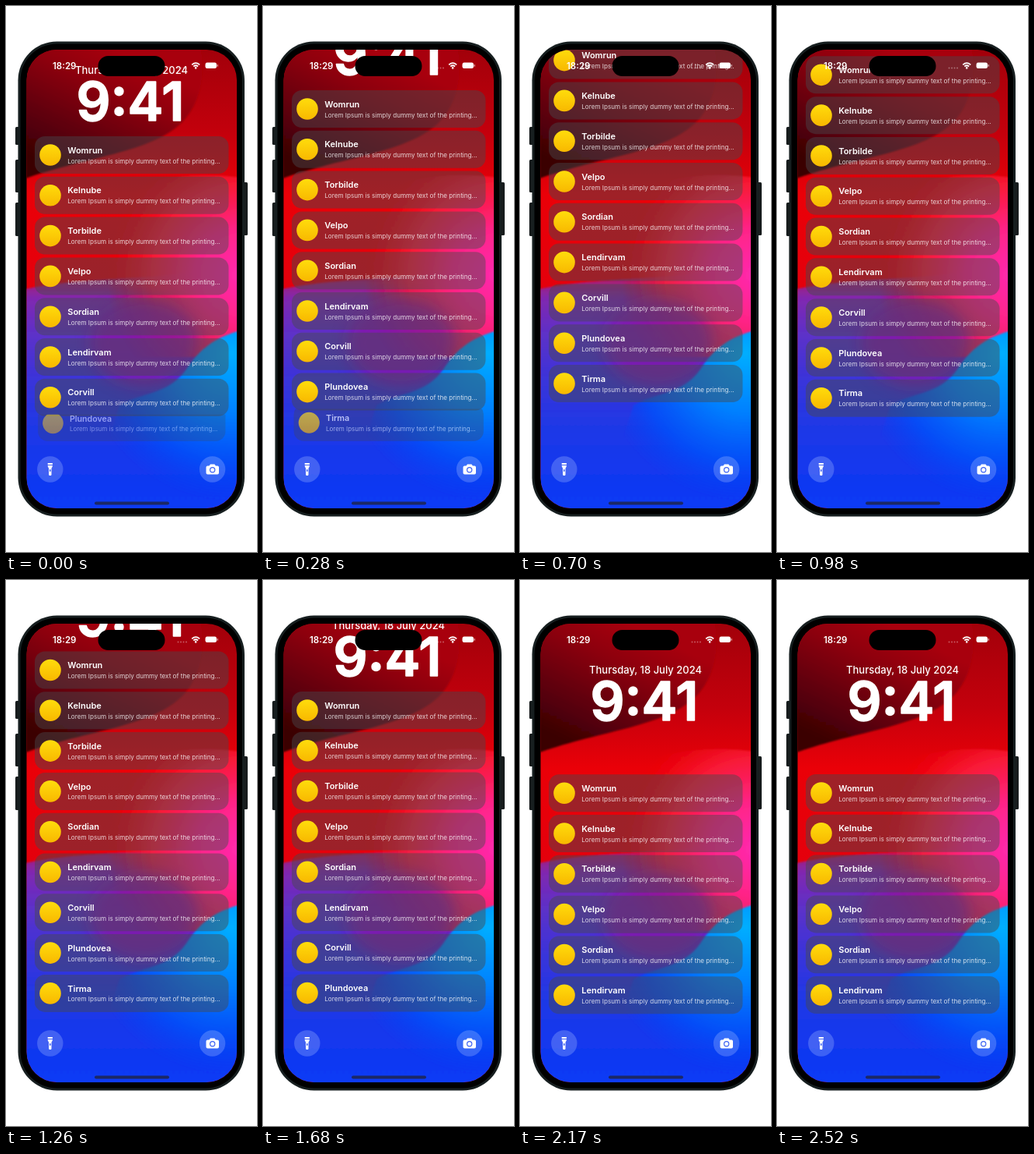
An HTML page that plays this animation: 323x700 px, repeating every 2580 ms.

```html
<!DOCTYPE html>
<html lang="en">
<head>
<meta charset="utf-8">
<title>Lock screen notifications</title>
<style>
html, body { margin: 0; width: 100%; height: 100%; overflow: hidden; background: #fff; }
svg { display: block; width: 100vw; height: 100vh; }
text { font-family: Inter, Roboto, sans-serif; fill: #fff; }
.name { font-size: 11px; font-weight: 600; }
.body { font-size: 8.15px; fill-opacity: .8; }
.date { font-size: 13px; font-weight: 500; text-anchor: middle; }
.time { font-size: 69px; font-weight: 600; text-anchor: middle;
  stroke: #fff; stroke-width: 1.6; stroke-linejoin: round; }
.status { font-size: 11.5px; font-weight: 600; }
</style>
</head>
<body>
<svg viewBox="0 0 323 700">
  <defs>
    <clipPath id="screen"><rect x="26.5" y="56" width="270.5" height="588" rx="39"/></clipPath>
    <clipPath id="below"><rect id="belowBox" x="27" width="270" height="200"/></clipPath>
    <filter id="soft" x="-20%" y="-20%" width="140%" height="140%"><feGaussianBlur stdDeviation="1.2"/></filter>
    <filter id="haze" x="-30%" y="-30%" width="160%" height="160%"><feGaussianBlur stdDeviation="10"/></filter>
    <linearGradient id="red" gradientUnits="userSpaceOnUse" x1="0" y1="56" x2="0" y2="365">
      <stop offset="0" stop-color="#a2000a"/>
      <stop offset=".35" stop-color="#c4000c"/>
      <stop offset=".6" stop-color="#ea0008"/>
      <stop offset="1" stop-color="#e4000c"/>
    </linearGradient>
    <linearGradient id="dark" gradientUnits="userSpaceOnUse" x1="75" y1="215" x2="150" y2="60">
      <stop offset="0" stop-color="#3a0006"/>
      <stop offset=".35" stop-color="#620008"/>
      <stop offset=".7" stop-color="#8c0009"/>
      <stop offset="1" stop-color="#a8000b"/>
    </linearGradient>
    <linearGradient id="blue" gradientUnits="userSpaceOnUse" x1="0" y1="345" x2="0" y2="644">
      <stop offset="0" stop-color="#b41c60"/>
      <stop offset=".1" stop-color="#8028b0"/>
      <stop offset=".25" stop-color="#5e30c8"/>
      <stop offset=".45" stop-color="#3a34da"/>
      <stop offset=".65" stop-color="#1f38e6"/>
      <stop offset="1" stop-color="#083af6"/>
    </linearGradient>
    <radialGradient id="pink" gradientUnits="userSpaceOnUse" cx="305" cy="345" r="175">
      <stop offset="0" stop-color="#ff2ab0"/>
      <stop offset=".35" stop-color="#ff2486"/>
      <stop offset=".68" stop-color="#fa1c3c" stop-opacity=".85"/>
      <stop offset="1" stop-color="#f20810" stop-opacity="0"/>
    </radialGradient>
    <radialGradient id="cyan" gradientUnits="userSpaceOnUse" cx="290" cy="445" r="190">
      <stop offset="0" stop-color="#00aeff"/>
      <stop offset=".4" stop-color="#0080ff"/>
      <stop offset=".75" stop-color="#0450fa" stop-opacity=".8"/>
      <stop offset="1" stop-color="#0640f6" stop-opacity="0"/>
    </radialGradient>
    <linearGradient id="gold" x2="0" y2="1">
      <stop offset="0" stop-color="#ffdc0c"/>
      <stop offset="1" stop-color="#f8b800"/>
    </linearGradient>
  </defs>

  <g fill="#171c1d">
    <rect x="12" y="155" width="6" height="23" rx="1.5"/>
    <rect x="12" y="197" width="6" height="42" rx="1.5"/>
    <rect x="12" y="252" width="6" height="43" rx="1.5"/>
    <rect x="305" y="226" width="6" height="68" rx="1.5"/>
  </g>
  <rect x="15.5" y="45.5" width="291.5" height="609" rx="50" fill="#171f20"/>
  <rect x="18.5" y="48.5" width="285.5" height="603" rx="47" fill="#000"/>

  <g clip-path="url(#screen)">
    <rect x="26" y="56" width="272" height="589" fill="url(#red)"/>
    <path d="M20 50H250C256 86 252 118 232 143C196 188 104 192 20 223Z" fill="url(#dark)" filter="url(#soft)"/>
    <path d="M10 366C90 348 150 352 215 344L310 330V655H10Z" fill="url(#blue)" filter="url(#soft)"/>
    <path d="M100 278C130 232 210 206 310 221V450H100Z" fill="url(#pink)" filter="url(#soft)"/>
    <ellipse cx="178" cy="432" rx="70" ry="56" fill="#8612a8" opacity=".8" filter="url(#haze)"/>
    <path d="M310 414C266 424 248 442 232 466C210 498 172 496 146 512L100 655H310Z" fill="url(#cyan)" filter="url(#soft)"/>

    <g id="clock">
      <text class="date" x="161.5" y="120">Thursday, 18 July 2024</text>
      <text class="time" x="160" y="180">9:41</text>
    </g>
    <g id="list"></g>

    <text class="status" x="60" y="80.5">18:29</text>
    <g fill="#fff" opacity=".35">
      <circle cx="221.5" cy="79.5" r="1"/><circle cx="225" cy="79.5" r="1"/>
      <circle cx="228.5" cy="79.5" r="1"/><circle cx="232" cy="79.5" r="1"/>
    </g>
    <g fill="none" stroke="#fff" stroke-width="1.7">
      <path d="M239.2 75.3Q244.2 70.9 249.2 75.3M241.3 77.5Q244.2 75 247.1 77.5"/>
      <circle cx="244.2" cy="79.4" r=".5"/>
    </g>
    <rect x="256.5" y="72.5" width="14.5" height="7.6" rx="2.4" fill="#fff"/>
    <rect x="271.6" y="75" width="1.2" height="2.8" rx=".6" fill="#fff" opacity=".7"/>

    <g fill="#a9c0ff" fill-opacity=".3">
      <circle cx="56.8" cy="594" r="16.7"/><circle cx="265.6" cy="594" r="16.7"/>
    </g>
    <g fill="#fff">
      <path d="M53.7 586H59.9V588H53.7ZM53.7 589H59.9C59.9 591.4 58.5 591.6 58.5 593.2V600.8Q58.5 602 57.4 602H56.2Q55.1 602 55.1 600.8V593.2C55.1 591.6 53.7 591.4 53.7 589Z"/>
      <path d="M259.5 589.6H261.5L263 587.6H268.4L269.9 589.6H272Q274 589.6 274 591.6V598.4Q274 600.4 272 600.4H259.5Q257.5 600.4 257.5 598.4V591.6Q257.5 589.6 259.5 589.6Z"/>
    </g>
    <rect x="56" y="594" width="1.6" height="3" rx=".8" fill="#3d62f2"/>
    <circle cx="265.7" cy="594.8" r="3.1" fill="none" stroke="#3d62f2" stroke-width="1.2"/>
    <rect x="114" y="635.5" width="96" height="4" rx="2" fill="#1b2866"/>
  </g>
  <rect x="118.5" y="64" width="86" height="26" rx="13" fill="#000"/>
</svg>

<script>
const names = ["Womrun", "Kelnube", "Torbilde", "Velpo", "Sordian",
  "Lendirvam", "Corvill", "Plundovea", "Tirma"];
const LOOP = 2580, STEP = 70;
const PITCH = 51.8, HALF = 24, FLOOR = 557, FADE = 43, MID = 161.75;

// time in ms, centre of the first card, speed in px/ms
const scroll = [
  [0, 191, -.24], [280, 132, -.2], [700, 69.6, 0], [1260, 115.5, .06],
  [1680, 167, .3], [1960, 265, .07], [2520, 273, 0]
];

const $ = id => document.getElementById(id);
const list = $("list"), clock = $("clock"), belowBox = $("belowBox");

list.innerHTML = names.map(name => `<g><g>
  <rect x="-124.75" y="-24" width="249.5" height="48" rx="13" fill="#46484e" fill-opacity=".46"/>
  <circle cx="-104.75" r="13.8" fill="url(#gold)"/>
  <text class="name" x="-82.5" y="-2.4">${name}</text>
  <text class="body" x="-82.5" y="10.6">Lorem Ipsum is simply dummy text of the printing...</text>
</g></g>`).join("");
const cards = [...list.children];

function scrollAt(t) {
  const i = Math.max(1, scroll.findIndex(k => k[0] >= t));
  const [t0, y0, v0] = scroll[i - 1], [t1, y1, v1] = scroll[i];
  const d = t1 - t0, u = (t - t0) / d, w = 1 - u;
  return w * w * ((1 + 2 * u) * y0 + u * d * v0) + u * u * ((3 - 2 * u) * y1 - w * d * v1);
}

function placeCard(card, y) {
  const over = Math.max(0, y + HALF - FLOOR);
  const scale = 1 - over * .0016;
  // past the floor a card shrinks and fades behind the one above it
  if (over > 0 && over < FADE) {
    belowBox.setAttribute("y", y - PITCH + HALF - 2);
    y = FLOOR - HALF * scale + over * .05;
  }
  card.style.display = over < FADE ? "" : "none";
  card.setAttribute("clip-path", over ? "url(#below)" : "none");
  card.firstElementChild.setAttribute("transform", `translate(${MID} ${y}) scale(${scale})`);
  card.firstElementChild.setAttribute("opacity", Math.max(0, 1 - over / FADE));
}

function draw(t) {
  const top = scrollAt(Math.floor(t / STEP) * STEP);
  clock.setAttribute("transform", `translate(0 ${Math.min(0, top - 224)})`);
  cards.forEach((card, i) => placeCard(card, top + i * PITCH));
}

const start = performance.now();
function tick() {
  draw((performance.now() - start) % LOOP);
  requestAnimationFrame(tick);
}
tick();
</script>
</body>
</html>
```
